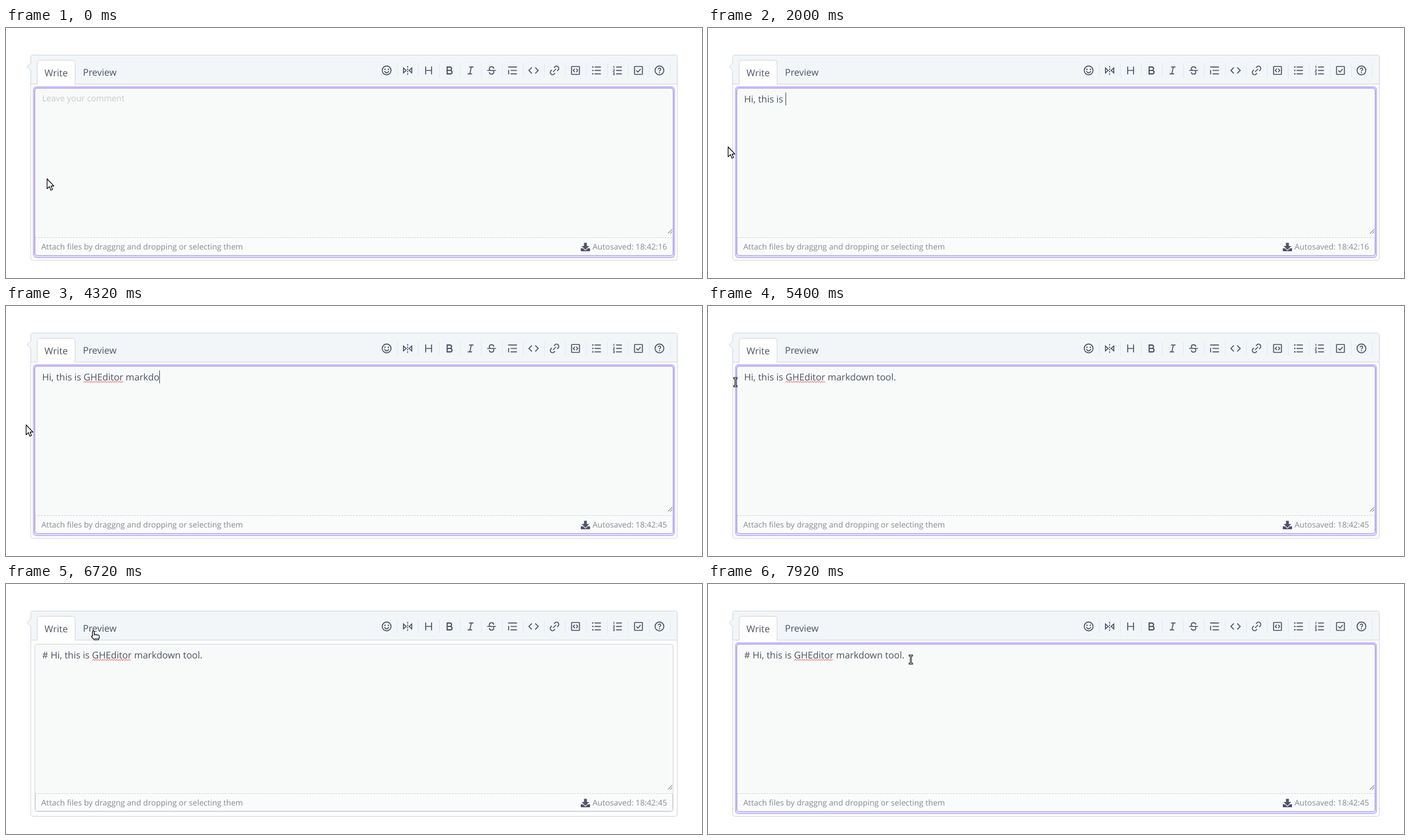
These frames come from a looping animation (1194x430 px, 8000 ms). An HTML page:

```html
<!DOCTYPE html>
<html lang="en">
<head>
<meta charset="utf-8">
<title>Markdown comment editor</title>
<style>
html, body { margin: 0; width: 1194px; height: 430px; overflow: hidden; background: #fff; }
svg { display: block; }
text { font-family: "Open Sans", "Noto Sans", sans-serif; white-space: pre; text-rendering: geometricPrecision; }
.tab, #typed { font-size: 16px; fill: #4e5365; }
.small { font-size: 13.6px; fill: #888a90; }
.edge { stroke: #d0d4dc; }
.icon { fill: none; stroke: #50546a; stroke-width: 2; }
.icon .dot { fill: #50546a; stroke: none; }
.cursor { fill: #fff; stroke: #000; stroke-width: 1.2; stroke-linejoin: round; }
</style>
</head>
<body>
<svg width="1194" height="430" viewBox="0 0 1194 430">
  <rect id="panel" class="edge" x="42.5" y="46.5" width="1109" height="353" rx="3" fill="#fff"/>
  <path d="M43 96V49.500q0-2.500 2.500-2.500h1103q2.500 0 2.500 2.500V96z" fill="#f2f6f9"/>
  <path class="edge" d="M43 96.500H1151"/>
  <path class="edge" d="M43 59.500L36 66.500L43 73.500" fill="#f2f6f9"/>
  <path id="tabBox" class="edge" fill="#fff"/>
  <text id="writeTab" class="tab" x="66">Write</text>
  <text id="previewTab" class="tab" x="132">Preview</text>
  <g id="tools"></g>

  <g id="editor">
    <rect id="ring" x="47.500" y="101.500" width="1099" height="293" rx="5" fill="none" stroke="#cdc2fb" stroke-width="3"/>
    <rect id="field" class="edge" x="49.500" y="103.500" width="1095" height="288" rx="4" fill="#f8faf9"/>
    <path d="M50 361H1144V388q0 3-3 3H53q-3 0-3-3z" fill="#fafbfb"/>
    <path id="footEdge" class="edge" d="M50.500 361V387.500q0 3 3 3H1140.500q3 0 3-3V361" fill="none"/>
    <path d="M50 360.500H1144" stroke="#d0d4d6" stroke-dasharray="3 2"/>
    <path d="M1135.500 353.500l7.500-7.500M1139.500 353.500l3.500-3.500" stroke="#555"/>
    <rect id="outline" x="49.500" y="103.500" width="1095" height="288" rx="4" fill="none" stroke="#9f8be8"/>
    <text class="small" x="60.500" y="381">Attach files by draggng and dropping or selecting them</text>
    <text id="saved" class="small" x="1134" y="381" text-anchor="end"></text>
    <path d="M991.500 369.500h5v5.500h4l-6.500 6.500l-6.500-6.500h4zM986 379h4l4 4l4-4h4v4q0 1-1 1h-14q-1 0-1-1z" fill="#50546a"/>
    <text id="hint" x="62" y="126" font-size="14.4" fill="#c6c9cb">Leave your comment</text>
    <text id="typed" x="62" y="128"></text>
    <path id="squiggle" fill="none" stroke="#f03a3a"/>
    <rect id="caret" y="111" width="1" height="22" fill="#3f4454"/>
  </g>

  <g id="preview">
    <text id="heading" x="58" y="148" font-size="32" font-weight="600" fill="#4e5365"></text>
    <path d="M58 165.500H1136" stroke="#e4e7ec"/>
  </g>

  <path id="arrow" class="cursor" d="M.5.500V17.500L4.500 13.800L7 20L9.800 18.800L7.200 12.800H12.200z"/>
  <g id="hand" class="cursor">
    <path d="M3.800.7C4.900.7 5.400 1.400 5.400 2.300V6.300L11.800 7.500C13.400 7.800 14 8.600 14 9.800V12.500L12.600 15.800H5.300L1 11C.2 9.700 1.300 8.600 2.400 9.500V2.300C2.400 1.400 2.800.7 3.800.7z"/>
    <path d="M5.400 6.300V9M8.300 7V9M11.200 7.600V9.400M5.500 13.500H12.500" fill="none" stroke-width=".8"/>
  </g>
  <g id="beam" fill="none">
    <path d="M-3.500-7h7M-3.500 7h7M0-7V7" stroke="#000" stroke-width="3"/>
    <path d="M-2.500-7h5M-2.500 7h5M0-7V7" stroke="#fff"/>
  </g>
</svg>

<script>
const LOOP = 8000;
const el = id => document.getElementById(id);
const show = (id, on) => { el(id).style.display = on ? "" : "none"; };
const line = d => `<path d="${d}"/>`;
const dot = (x, y, r) => `<circle class="dot" cx="${x}" cy="${y}" r="${r}"/>`;
const box = '<rect x="4" y="4" width="16" height="16" rx=".5"/>';
const ring = '<circle cx="12" cy="12" r="9"/>';

// Toolbar, each icon on a 24 unit grid
const icons = [
  ring + line("M8 13a4 4 0 0 0 8 0") + dot(8.500, 9.500, 1.4) + dot(15.500, 9.500, 1.4),
  line("M3.500 7V17L9 12zM20.500 7V17L15 12z") + '<path d="M12 3V21" stroke-dasharray="3 2"/>',
  line("M6 4V20M18 4V20M6 12H18"),
  '<path stroke-width="2.4" d="M7 12V5h5.500a3.500 3.500 0 0 1 0 7zV19h6.500a3.500 3.500 0 0 0 0-7z"/>',
  line("M9 5H18M6 19H15M13.500 5L10.500 19"),
  line("M3 12H21M16.500 8.500C16.500 6 14.500 4.500 12 4.500C6.500 4.500 6 10.500 10 12M7.500 15.500C7.500 18 9.500 19.500 12 19.500C17 19.500 18 14.500 15 12"),
  line("M3 5H21M8 12H21M8 19H21M4 11V20"),
  line("M8.500 6L2.500 12L8.500 18M15.500 6L21.500 12L15.500 18"),
  line("M9 15L15 9M11 6.500l2-2a4.600 4.600 0 0 1 6.500 6.500l-2 2M13 17.500l-2 2a4.600 4.600 0 0 1-6.500-6.500l2-2"),
  box + line("M10.500 8.500L7.500 12L10.500 15.500M13.500 8.500L16.500 12L13.500 15.500"),
  [5, 12, 19].map(y => line(`M8 ${y}H21`) + dot(4.500, y, 1.5)).join(""),
  [5, 12, 19].map(y => line(`M9 ${y}H21`)).join("") +
    '<path stroke-width="1.3" d="M3.500 3.500H4.800V7.500M3 10H5.500V12L3.500 14H6M3 16.500H5.500V21H3M3.500 18.700H5.500"/>',
  box + line("M7.500 12L11 15.200L16.500 9"),
  ring + line("M9.500 9.700a2.500 2.500 0 1 1 3.600 2.200C12.300 12.300 12 12.800 12 14") + dot(12, 16.700, 1.2)
];
el("tools").innerHTML = icons.map((art, i) => {
  const x = 653 + 36 * i;
  return `<g class="icon" transform="translate(${x} 73) scale(.84) translate(-12 -12)">${art}</g>
    <path d="M${x + 18.5} 61V85" stroke="#e3e8ed"/>`;
}).join("");

// Bursts of typing: first key, last key, text
const bursts = [
  [480, 720, "Hi"], [1040, 1120, ", "], [1400, 1680, "this "], [1840, 2000, "is "],
  [2280, 2280, "G"], [2560, 2560, "H"], [2760, 2760, "E"], [2920, 3000, "di"],
  [3200, 3320, "to"], [3520, 3840, "r mar"], [4040, 4160, "kd"], [4320, 5080, "own tool."]
];
const caretOff = [[0, 240], [920, 1040], [1360, 1400], [2240, 2280], [2520, 2560], [5320, 5760], [6720, LOOP]];

// Pointer glides: start, end, x and y before and after, shape seen along the way
const glides = [
  [0, 40, 70, 259, 71, 254, ["arrow"]],
  [480, 640, 71, 254, 34, 204, ["beam", "arrow"]],
  [5320, 5400, 34, 204, 45, 134, ["arrow"]],
  [5400, 5680, 45, 134, 60, 110, ["beam"]],
  [6560, 6680, 60, 110, 146, 80, ["beam", "arrow", "hand"]],
  [7040, 7120, 146, 80, 85, 77, ["hand"]],
  [7440, 7640, 85, 77, 348, 130, ["hand", "arrow", "beam"]]
];

function typedText(t) {
  let s = "";
  for (const [a, b, str] of bursts) {
    const gap = (b - a) / Math.max(1, str.length - 1);
    for (let i = 0; i < str.length; i++) if (t >= Math.round((a + gap * i) / 40) * 40) s += str[i];
  }
  return s;
}

function pointer(t) {
  let now = { x: 70, y: 259, shape: "arrow" };
  for (const [a, b, x0, y0, x1, y1, shapes] of glides) {
    if (t < a || a === 0 && t < b) continue;
    const k = Math.min(1, (t - a + 40) / (b - a + 40));
    now = {
      x: Math.round(x0 + (x1 - x0) * k),
      y: Math.round(y0 + (y1 - y0) * k),
      shape: shapes[Math.min(shapes.length - 1, Math.floor(k * shapes.length))]
    };
  }
  return now;
}

const tabPath = (x0, x1) => `M${x0} 97V59.500q0-4 4-4H${x1 - 4}q4 0 4 4V97`;

function draw(time) {
  const t = Math.floor((time % LOOP) / 40) * 40;
  const preview = t >= 6800 && t < 7280;
  const focus = t < 6720 || t >= 7920 ? 1 : t >= 7800 ? .5 : 0;
  const body = typedText(t);
  const mark = t >= 6320 ? "# " : t >= 6160 ? "#" : "";
  const typed = el("typed");
  typed.textContent = mark + body;
  const width = n => n ? typed.getSubStringLength(0, n) : 0;

  show("hint", !body);
  show("editor", !preview);
  show("preview", preview);
  el("heading").textContent = body;
  el("panel").setAttribute("height", preview ? 136 : 353);
  el("tabBox").setAttribute("d", preview ? tabPath(119.5, 203.5) : tabPath(53.5, 118.5));
  el("writeTab").setAttribute("y", preview ? 82 : 83);
  el("previewTab").setAttribute("y", preview ? 83 : 82);
  el("ring").style.opacity = el("outline").style.opacity = focus;
  el("footEdge").style.opacity = 1 - focus * .7;
  el("saved").textContent = "Autosaved: 18:42:" + (t < 3000 ? "16" : "45");

  if (!preview) {
    const at = t >= 5760 ? mark.length : body.length;
    el("caret").setAttribute("x", Math.round(62 + width(at)));
    show("caret", !caretOff.some(([a, b]) => t >= a && t < b));

    const word = "GHEditor", pos = typed.textContent.indexOf(word + " ");
    show("squiggle", pos >= 0);
    if (pos >= 0) {
      const x0 = Math.round(62 + width(pos)), x1 = 62 + width(pos + word.length);
      let d = `M${x0} 131.500`;
      for (let x = x0 + 2, up = true; x <= x1; x += 2, up = !up) d += `L${x} ${up ? 129.5 : 131.5}`;
      el("squiggle").setAttribute("d", d);
    }
  }

  const p = pointer(t);
  for (const id of ["arrow", "hand", "beam"]) show(id, id === p.shape);
  el(p.shape).setAttribute("transform", `translate(${p.x} ${p.y})`);
}

function tick() {
  draw(performance.now());
  requestAnimationFrame(tick);
}
tick();
</script>
</body>
</html>
```
